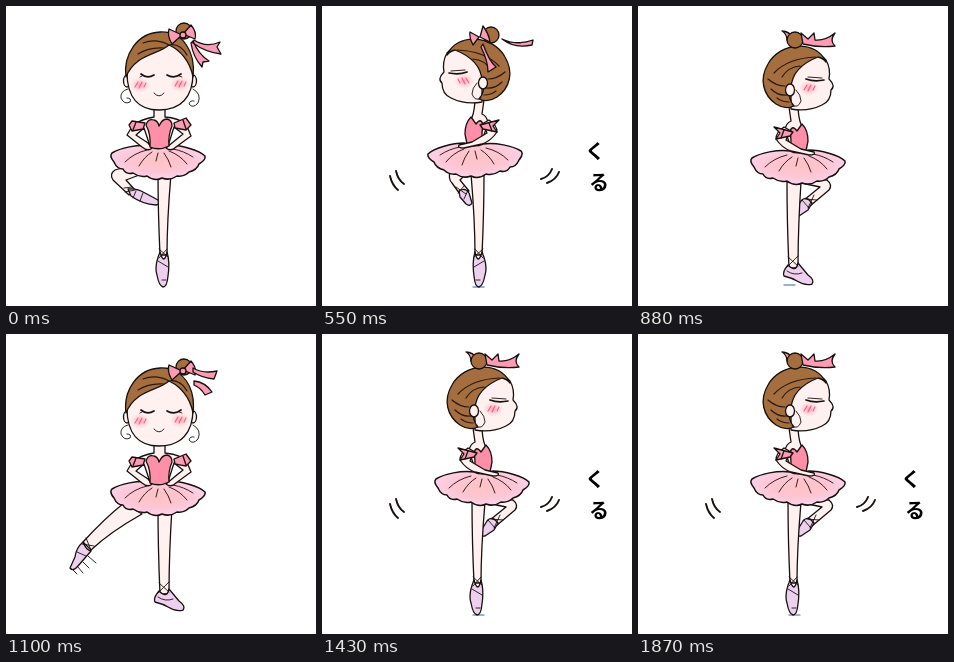
Recreate the animation shown at these times as an HTML page. Size 310 by 300 pixels, loop 1.98 s.

```html
<!DOCTYPE html>
<html lang="ja">
<head>
<meta charset="utf-8">
<title>Pirouette</title>
<style>
html, body { margin: 0; width: 100%; height: 100%; overflow: hidden; background: #fff; }
.strip { display: block; width: 2170px; height: 300px; animation: turn 1980ms step-end infinite; }
path, ellipse, circle { stroke: #17100f; stroke-width: 1.3; stroke-linecap: round; stroke-linejoin: round; }
.skin { fill: #fff1ef; }
.hair { fill: #a56e3e; }
.pink { fill: #fb9cb4; }
.top { fill: #fd8fa8; }
.shoe { fill: #edd0ee; }
.line { fill: none; }
.thin { fill: none; stroke-width: .9; }
.strand { fill: none; stroke: #2a1810; stroke-width: 1.2; }
.lash { fill: none; stroke-width: 1.7; }
.glow { fill: url(#cheek); stroke: none; }
.hatch { fill: none; stroke: #f4607f; stroke-width: 1.1; }
.whoosh { fill: none; stroke-width: 1.9; }
.tutu { fill: url(#tulle); stroke-width: 1.5; }
text { font: 700 20px "Noto Sans CJK JP", "Noto Sans CJK", sans-serif; text-anchor: middle; fill: #000; }

/* Seven poses side by side: front, left, back, right, landing, plié, extension */
@keyframes turn {
  0%, 22.2222%, 77.7777% { transform: translateX(0); }
  5.5555%, 27.7777%, 61.1111%, 83.3333% { transform: translateX(-310px); }
  11.1111%, 33.3333%, 66.6666%, 88.8888% { transform: translateX(-620px); }
  16.6666%, 38.8888%, 72.2222%, 94.4444%, 100% { transform: translateX(-930px); }
  44.4444% { transform: translateX(-1240px); }
  50% { transform: translateX(-1550px); }
  55.5555% { transform: translateX(-1860px); }
}
</style>
</head>
<body>
<svg class="strip" viewBox="0 0 2170 300" xmlns="http://www.w3.org/2000/svg">
<defs>
  <radialGradient id="tulle" cx=".5" cy=".45" r=".55">
    <stop offset="0" stop-color="#ffc2c4"/>
    <stop offset=".55" stop-color="#fec5d3"/>
    <stop offset="1" stop-color="#fad3ec"/>
  </radialGradient>
  <radialGradient id="cheek">
    <stop offset="0" stop-color="#ff9fb2"/>
    <stop offset="1" stop-color="#ffc9d0" stop-opacity="0"/>
  </radialGradient>

  <g id="tutu">
    <path class="tutu" d="M144 140C132 138 114 142 106 147Q103 150 108 156Q111 163 117 163Q120 169 127 167Q134 172 141 170Q149 176 156 172Q164 175 171 170Q178 171 183 166Q191 164 193 158Q200 154 199 150C193 144 174 139 163 139Q153 144 144 140Z"/>
    <path class="thin" d="M141 144Q128 147 119 156M146 146Q138 151 133 160M152 147L150 155M158 147Q163 154 165 161M163 145Q174 149 181 158M167 143Q178 145 187 151"/>
  </g>

  <g id="cheekMark">
    <ellipse class="glow" rx="10" ry="8"/>
    <path class="hatch" d="M-5 2L-2-3M-1 3L2-3M4 2L6-2"/>
  </g>

  <g id="pointe">
    <path class="skin" d="M151 168Q151 205 153 249H160Q160 215 164 168Z"/>
    <path class="shoe" d="M153 246Q147 260 150 269Q152 280 156 281Q160 281 161 270Q163 256 160 246Q157 260 153 246Z"/>
    <path class="thin" d="M152 243L161 251M160 243L152 252M151 255L161 261M155 274H159"/>
  </g>

  <g id="flat">
    <path class="skin" d="M152 174Q152 215 154 260H163Q163 220 166 174Z"/>
    <path class="shoe" d="M153 257Q147 264 149 268Q157 270 162 273Q170 278 177 276Q180 272 173 267L163 255Q161 265 153 257Z"/>
    <path class="thin" d="M153 249L163 258M163 248L152 259M152 263Q159 268 167 265"/>
  </g>

  <g id="tucked">
    <path class="skin" d="M123 160L109 164Q103 168 107 174L123 189L129 184L120 174L136 168Z"/>
    <path class="shoe" d="M122 183Q131 182 139 187L152 194Q156 198 150 199Q136 198 125 190Z"/>
    <path class="thin" d="M118 182L126 181M119 186L129 184M130 185L127 192M137 187L134 195"/>
  </g>

  <g id="shin">
    <path class="skin" d="M178 164L191 166Q197 171 193 176L174 192L168 186L184 173L170 170Z"/>
    <path class="shoe" d="M176 189Q170 181 165 187L159 197Q157 203 163 202L172 196Z"/>
    <path class="thin" d="M178 181L172 194M181 186L169 185M166 186L173 194"/>
  </g>

  <g id="frontTop">
    <use href="#tutu"/>
    <path class="skin" d="M148 100V111Q136 113 127 119L121 129L136 141Q142 146 146 142L142 137L130 129L138 122L144 140H162L168 121L177 128L166 137L160 142Q165 146 170 141L185 130L180 118Q172 112 159 111V100Z"/>
    <path class="top" d="M140 119Q142 112 148 114Q152 115 153 120Q156 113 161 113Q166 114 166 120Q162 129 163 140Q153 145 144 141Q145 128 140 119Z"/>
    <path class="pink" d="M126 115L139 117L137 123L126 125L123 119ZM168 117L180 112L185 119L180 124L169 122Z"/>
    <path class="line" d="M130 116L127 124M177 114L180 123"/>
    <circle class="hair" cx="178" cy="25" r="8"/>
    <ellipse class="skin" cx="121" cy="75" rx="3.5" ry="6"/>
    <ellipse class="skin" cx="187" cy="75" rx="3.5" ry="6"/>
    <path class="skin" d="M121 66C121 92 133 104 153 104C175 104 187 91 187 67C186 50 176 36 153 36C131 38 121 48 121 66Z"/>
    <path class="hair" d="M120 71C117 49 131 27 154 26C177 25 190 46 187 71C184 55 174 44 163 39C152 49 129 48 120 71Z"/>
    <path class="strand" d="M163 39Q150 32 137 37M158 42Q143 41 132 48M163 39Q174 37 181 49"/>
    <path class="thin" d="M122 83Q114 85 115 92Q118 99 124 96Q126 92 121 92M187 83Q196 88 192 97Q187 103 183 98Q184 94 188 95"/>
    <path class="lash" d="M135 68Q141 73 148 69M161 69Q168 73 175 68"/>
    <path class="thin" d="M136 70L134 71M173 70L176 71M148 87Q153 93 158 87"/>
    <use href="#cheekMark" x="134" y="79"/>
    <use href="#cheekMark" x="174" y="78"/>
    <path class="pink" d="M176 29L163 23Q161 30 166 38ZM177 28L185 19Q191 26 189 33Z"/>
    <circle class="pink" cx="177" cy="29" r="3"/>
  </g>

  <g id="sideTop">
    <use href="#tutu" x="8" y="-2"/>
    <path class="skin" d="M151 94L153 108Q148 110 147 117L153 135H168L165 115Q161 110 160 95Z"/>
    <path class="top" d="M152 119Q154 111 159 118L164 111Q170 117 170 128L168 138Q160 140 152 137Q154 129 152 119Z"/>
    <path class="skin" d="M146 114Q138 119 138 126Q144 135 153 138L171 142Q178 142 176 139L163 136L148 127Q150 121 153 118Z"/>
    <path class="pink" d="M136 114L155 119L152 123L138 126L142 120Z"/>
    <path class="line" d="M146 117L143 125"/>
    <path class="skin" d="M153 45Q176 33 188 47Q193 56 191 66Q198 73 193 77Q193 88 184 92Q170 99 153 96Z"/>
    <path class="hair" d="M188 49C178 26 142 29 130 51C121 66 125 82 138 91Q147 97 156 93Q149 85 153 75Q154 54 180 44Q185 45 188 49Z"/>
    <path class="strand" d="M178 44Q150 45 136 60M162 53Q150 54 144 64M147 73Q138 73 130 66M149 82Q140 83 133 76M151 89Q144 89 139 85"/>
    <ellipse class="skin" cx="152" cy="77" rx="4.5" ry="6"/>
    <path class="thin" d="M158 77Q163 82 163 88Q160 96 154 92"/>
    <path class="lash" d="M168 66Q176 69 186 67"/>
    <path class="thin" d="M170 64L184 65"/>
    <use href="#cheekMark" x="171" y="75"/>
  </g>

  <g id="rightTop">
    <use href="#sideTop"/>
    <path class="pink" d="M155 25Q151 18 144 18Q149 21 149 27Z"/>
    <circle class="hair" cx="157" cy="27" r="8"/>
    <path class="pink" d="M165 31L163 20L170 26L176 20L177 27Q187 28 197 20Q191 28 197 33Q182 35 165 31Z"/>
  </g>

  <path id="shade" style="stroke:#789bc0" d="M151 281H162"/>

  <g id="kana">
    <text y="7">く</text>
    <text x="4" y="38">る</text>
  </g>

  <g id="spin">
    <path class="whoosh" d="M68 170Q70 179 76 184M74 165Q76 174 82 178M219 173Q227 171 230 163M225 177Q234 174 237 166"/>
    <use href="#kana" x="273" y="146"/>
  </g>

  <path id="looseTails" class="pink" d="M187 34Q197 40 211 37L208 45Q196 44 187 38ZM188 47Q199 48 206 58L199 61Q195 54 188 51Z"/>
</defs>

<g>
  <use href="#tucked"/>
  <use href="#pointe" x="1"/>
  <use href="#frontTop"/>
  <path class="pink" d="M188 34Q200 42 214 36L211 41L215 48Q199 46 187 37ZM187 35Q193 49 203 55L197 56L196 61Q187 51 185 37Z"/>
</g>

<g transform="translate(310)">
  <path class="skin" d="M128 166Q126 173 130 177L140 191L147 185L138 174L144 168Z"/>
  <path class="shoe" d="M137 185Q143 181 147 187L150 197Q148 201 144 198L138 191Z"/>
  <path class="thin" d="M134 181L144 188M142 180L136 187M146 184L142 193"/>
  <use href="#shade"/>
  <use href="#pointe" transform="matrix(-1 0 0 1 313 0)"/>
  <use href="#sideTop" transform="matrix(-1 0 0 1 313 0)"/>
  <circle class="hair" cx="169" cy="29" r="8"/>
  <path class="pink" d="M157 31L148 26Q147 32 151 39ZM158 31L161 20Q167 28 168 36ZM180 33Q194 40 211 34L210 39Q193 43 180 33ZM161 38Q167 55 174 61L166 66Q166 55 159 41Z"/>
  <use href="#spin"/>
</g>

<g transform="translate(620)">
  <path class="skin" d="M184 164L197 167Q203 174 198 182L181 193L176 187L190 177L180 169Z"/>
  <path class="shoe" d="M183 190Q179 181 172 185L162 193Q158 199 165 199L178 195Z"/>
  <path class="thin" d="M184 184L179 194M188 188L175 187M171 186L176 195"/>
  <use href="#shade" x="-3"/>
  <use href="#pointe" x="-3"/>
  <use href="#tutu" x="5" y="-1"/>
  <path class="skin" d="M151 96V103Q140 106 131 114L125 128L139 137L147 135L145 130L135 127L143 120L150 138H169L174 120L181 126L171 132L173 137L190 127L185 113Q176 105 164 103V96Z"/>
  <path class="top" d="M148 120Q160 123 172 120Q167 129 169 139Q160 143 152 140Q153 129 148 120Z"/>
  <path class="pink" d="M132 111L143 115L140 122L129 123ZM172 116L185 110L189 119L185 124L173 121Z"/>
  <path class="line" d="M135 113L131 122M182 112L185 122"/>
  <path class="pink" d="M146 24L149 18L160 18L157 27ZM136 30L128 24L125 33L114 37L118 39L114 43Q128 43 137 35ZM133 38Q130 47 114 49L118 51L115 55Q130 53 136 42Z"/>
  <ellipse class="skin" cx="127" cy="75" rx="3.5" ry="6"/>
  <ellipse class="skin" cx="192" cy="75" rx="3.5" ry="6"/>
  <path class="hair" d="M160 25C137 25 126 45 127 67C128 88 141 99 160 99C180 99 193 87 193 65C193 42 181 25 160 25Z"/>
  <path class="strand" d="M160 38Q172 53 190 55M158 48Q170 66 190 66M164 65Q174 80 187 79M146 60Q137 63 131 72M130 76Q137 86 148 84M136 87Q142 92 150 91"/>
  <circle class="hair" cx="142" cy="27" r="8"/>
  <path class="line" d="M124 83Q115 87 117 95Q120 99 124 95M193 83Q187 90 191 93Q196 95 192 98"/>
  <path class="whoosh" d="M76 177Q80 185 90 187M78 163Q80 173 90 178M225 170Q231 166 231 158M234 176Q243 172 245 163"/>
  <use href="#kana" x="34" y="158"/>
</g>

<g transform="translate(930)">
  <use href="#shade"/>
  <use href="#shin"/>
  <use href="#pointe" x="-1"/>
  <use href="#rightTop"/>
  <use href="#spin"/>
</g>

<g transform="translate(1240)">
  <use href="#shade" x="-5" y="-2"/>
  <use href="#shin" x="-2" y="8"/>
  <use href="#flat" x="-3" y="2"/>
  <use href="#rightTop" y="7"/>
</g>

<g transform="translate(1550)">
  <use href="#tucked" y="8"/>
  <use href="#flat"/>
  <use href="#frontTop" y="8"/>
  <use href="#looseTails"/>
</g>

<g transform="translate(1860)">
  <path class="skin" d="M118 169Q98 185 77 208L85 216Q104 198 136 180Z"/>
  <path class="shoe" d="M77 208Q70 214 69 223L64 234Q67 238 72 232L85 217Q80 216 77 208Z"/>
  <path class="thin" d="M80 204L85 216M76 210L88 212M71 218L80 222M72 233L77 239M77 228L83 234M82 222L90 229M66 235L71 240"/>
  <use href="#flat"/>
  <use href="#frontTop" y="8"/>
  <use href="#looseTails"/>
</g>
</svg>
</body>
</html>
```
